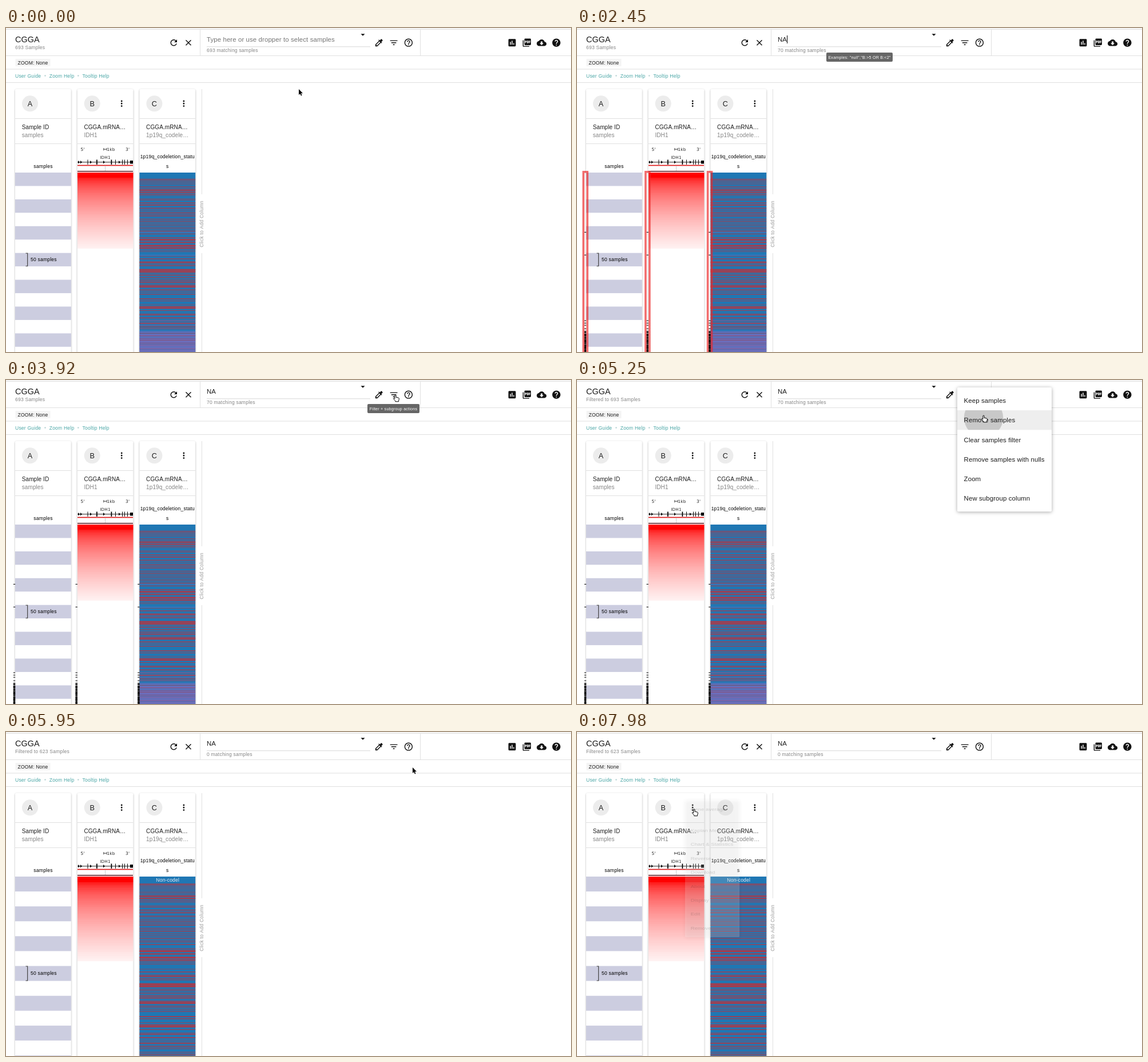
An HTML page with a canvas for the animation above (8000 ms loop, 988x567 px).

```html
<!DOCTYPE html>
<html lang="en">
<head>
<meta charset="utf-8">
<title>Sample filter</title>
<style>
  html, body { margin: 0; width: 100%; height: 100%; overflow: hidden; background: #fff; }
  canvas { display: block; }
</style>
</head>
<body>
<canvas id="stage" width="988" height="567"></canvas>
<script>
const ctx = document.getElementById('stage').getContext('2d');
const LOOP = 8000, STEP = 70;
const INK = '#1c1c1c', GREY = '#858585', RULE = '#e0e0e0';
const SANS = '"Liberation Sans", Arial, sans-serif', WIDE = '"DejaVu Sans", sans-serif';
const BODY = 11.43, SMALL = 10, CAPTION = 8.57, TIP = 7.15;
const TOP = 253, COLS = [16, 124.7, 233.4], COL_W = 97.8;

const ICONS = Object.fromEntries(Object.entries({
  refresh: 'M17.65 6.35C16.2 4.9 14.21 4 12 4c-4.42 0-7.99 3.58-7.99 8s3.57 8 7.99 8c3.73 0 6.84-2.55 7.73-6h-2.08c-.82 2.33-3.04 4-5.65 4-3.31 0-6-2.69-6-6s2.69-6 6-6c1.66 0 3.14.69 4.22 1.78L13 11h7V4z',
  close: 'M19 6.41L17.59 5 12 10.59 6.41 5 5 6.41 10.59 12 5 17.59 6.41 19 12 13.41 17.59 19 19 17.59 13.41 12z',
  drop: 'M7 10l5 5 5-5z',
  dropper: 'M20.71 5.63l-2.34-2.34c-.39-.39-1.02-.39-1.41 0l-3.12 3.12-1.93-1.91-1.41 1.41 1.42 1.42L3 16.25V21h4.75l8.92-8.92 1.42 1.42 1.41-1.41-1.92-1.92 3.12-3.12c.4-.4.4-1.03.01-1.42zM6.92 19L5 17.08l8.06-8.06 1.92 1.92z',
  filter: 'M10 18h4v-2h-4zM3 6v2h18V6zM6 13h12v-2H6z',
  helpOutline: 'M11 18h2v-2h-2zm1-16C6.48 2 2 6.48 2 12s4.48 10 10 10 10-4.48 10-10S17.52 2 12 2zm0 18c-4.41 0-8-3.59-8-8s3.59-8 8-8 8 3.59 8 8-3.59 8-8 8zm0-14c-2.21 0-4 1.79-4 4h2c0-1.1.9-2 2-2s2 .9 2 2c0 2-3 1.75-3 5h2c0-2.25 3-2.5 3-5 0-2.21-1.79-4-4-4z',
  chart: 'M19 3H5c-1.1 0-2 .9-2 2v14c0 1.1.9 2 2 2h14c1.1 0 2-.9 2-2V5c0-1.1-.9-2-2-2zM9 17H7v-7h2zm4 0h-2V7h2zm4 0h-2v-4h2z',
  pdf: 'M20 2H8c-1.1 0-2 .9-2 2v12c0 1.1.9 2 2 2h12c1.1 0 2-.9 2-2V4c0-1.1-.9-2-2-2zm-8.5 7.5c0 .83-.67 1.5-1.5 1.5H9v2H7.5V7H10c.83 0 1.5.67 1.5 1.5zm5 2c0 .83-.67 1.5-1.5 1.5h-2.5V7H15c.83 0 1.5.67 1.5 1.5zm4-3H19v1h1.5V11H19v2h-1.5V7h3zM9 9.5h1v-1H9zM4 6H2v14c0 1.1.9 2 2 2h14v-2H4zm10 5.5h1v-3h-1z',
  cloud: 'M19.35 10.04C18.67 6.59 15.64 4 12 4 9.11 4 6.6 5.64 5.35 8.04 2.34 8.36 0 10.91 0 14c0 3.31 2.69 6 6 6h13c2.76 0 5-2.24 5-5 0-2.64-2.05-4.78-4.65-4.96zM17 13l-5 5-5-5h3V9h4v4z',
  help: 'M12 2C6.48 2 2 6.48 2 12s4.48 10 10 10 10-4.48 10-10S17.52 2 12 2zm1 17h-2v-2h2zm2.07-7.75l-.9.92C13.45 12.9 13 13.5 13 15h-2v-.5c0-1.1.45-2.1 1.17-2.83l1.24-1.26c.37-.36.59-.86.59-1.41 0-1.1-.9-2-2-2s-2 .9-2 2H8c0-2.21 1.79-4 4-4s4 1.79 4 4c0 .88-.36 1.68-.93 2.25z',
  more: 'M10 6a2 2 0 1 1 4 0a2 2 0 1 1-4 0M10 12a2 2 0 1 1 4 0a2 2 0 1 1-4 0M10 18a2 2 0 1 1 4 0a2 2 0 1 1-4 0'
}).map(([name, d]) => [name, new Path2D(d)]));

const POINTERS = {
  arrow: new Path2D('M0 0V10L2.3 7.9 3.9 11.6 5.5 10.9 3.9 7.3H7z'),
  text: new Path2D('M-3-5.5q3 0 3 2v7q0 2-3 2M3-5.5q-3 0-3 2M0 3.5q0 2 3 2M-2 1.2h4'),
  hand: new Path2D('M-1.1 1.1Q-1 0 0 0T1.1 1.1V4.2L5.2 5.1Q6.6 5.5 6.4 7.2L5.6 10.2V11.8H-.2V10.6L-3.6 6.6Q-3.4 5.2-2 5.8L-1.1 6.6z')
};

// Pointer moves: start, end, target x, target y, downward bow
const MOVES = [
  [70, 490, 389, 21, 0], [2940, 3570, 681, 26, 0], [4480, 4970, 711, 62, 0],
  [6440, 7280, 241, 132, 40], [7280, 7560, 205, 135, 0]
];

const FILTER_MENU = {
  x: 665, y: 13, w: 165, gap: 0,
  items: ['Keep samples', 'Remove samples', 'Clear samples filter', 'Remove samples with nulls', 'Zoom', 'New subgroup column']
};
const COLUMN_MENU = {
  x: 189, y: 119, w: 114, gap: 17.8,
  items: ['Gene average', 'Kaplan Meier', 'Chart & Statistics', 'Reverse', 'Download', 'About', 'Display', 'Edit', 'Remove']
};

// One status per sample: b = non-codel, r = codel, n = no data
let seed = 11;
const random = () => (seed = (seed * 16807) % 2147483647) / 2147483647;
const NULL_ROWS = [222, 307, 552, 561, 569, 582], CODEL_RUNS = [65, 250, 272, 369, 426, 505];
const allRows = Array.from({ length: 693 }, (_, i) => {
  const codel = random() < 0.27, missing = i >= 590 && random() < 0.62;
  if (missing || NULL_ROWS.includes(i)) return 'n';
  return CODEL_RUNS.some(c => Math.abs(i - c) < 3) || (codel && i > 19) ? 'r' : 'b';
});
const keptRows = allRows.filter(s => s !== 'n');

const clamp = v => Math.max(0, Math.min(1, v));
const smooth = v => (v = clamp(v), v * v * (3 - 2 * v));
const fade = (t, from, to, d = 140) => Math.min(clamp((t - from) / d), clamp((to - t) / d));

function rect(x, y, w, h, color) {
  ctx.fillStyle = color;
  ctx.fillRect(x, y, w, h);
}

function disc(x, y, r, color) {
  ctx.fillStyle = color;
  ctx.beginPath();
  ctx.arc(x, y, r, 0, 7);
  ctx.fill();
}

function text(s, x, y, size = CAPTION, color = INK, align = 'left', family = SANS) {
  ctx.font = `${size}px ${family}`;
  ctx.letterSpacing = size < 9 ? '0.2px' : '0.1px';
  ctx.textAlign = align;
  ctx.fillStyle = color;
  ctx.fillText(s, x, y);
  return ctx.measureText(s).width;
}

function icon(name, x, y, scale = 0.7146) {
  ctx.save();
  ctx.translate(x, y);
  ctx.scale(scale, scale);
  ctx.translate(-12, -12);
  ctx.fillStyle = '#111';
  ctx.fill(ICONS[name], 'evenodd');
  ctx.restore();
}

function panel(x, y, w, h, blur, alpha) {
  ctx.save();
  ctx.shadowColor = `rgba(0,0,0,${alpha})`;
  ctx.shadowBlur = blur;
  ctx.shadowOffsetY = 1;
  ctx.fillStyle = '#fff';
  ctx.beginPath();
  ctx.roundRect(x, y, w, h, 2);
  ctx.fill();
  ctx.restore();
}

function tooltip(s, x, y, w, alpha) {
  ctx.globalAlpha = alpha;
  ctx.fillStyle = '#666';
  ctx.beginPath();
  ctx.roundRect(x, y, w, 16, 2);
  ctx.fill();
  text(s, x + w / 2, y + 10.6, TIP, '#fff', 'center');
  ctx.globalAlpha = 1;
}

function drawHeader(t) {
  rect(0, 1.5, 988, 1.2, '#dcdcdc');
  for (const y of [48, 71.5, 95]) rect(0, y, 988, 1, RULE);
  for (const x of [339, 724]) rect(x, 3, 1, 45, RULE);

  text('CGGA', 16, 25, 14.4);
  const count = t < 5180 ? '693' : t < 5600 ? 'Filtered to 693' : 'Filtered to 623';
  text(count + ' Samples', 16, 37.3, CAPTION, GREY);
  icon('refresh', 293.3, 25.7);
  icon('close', 319, 25.7);

  const typed = t < 1960 ? '' : t < 2170 ? 'N' : 'NA';
  const width = typed ? text(typed, 351, 24, BODY) : 0;
  if (!typed) text('Type here or use dropper to select samples', 351, 24, BODY, '#757575');
  if ((t >= 630 && t < 1120) || (t >= 1680 && t < 2660) || (t >= 3150 && t < 3640)) rect(351 + width, 13, 1, 14, '#000');
  rect(351, 32.3, 286, 1, '#d8d8d8');
  text((t < 2240 ? 693 : t < 5600 ? 70 : 0) + ' matching samples', 351, 41.5, CAPTION, GREY);
  icon('drop', 624, 11.6);
  ['dropper', 'filter', 'helpOutline'].forEach((name, i) => icon(name, 652.3 + i * 25.8, 25.7));
  ['chart', 'pdf', 'cloud', 'help'].forEach((name, i) => icon(name, 885 + i * 25.8, 25.7));

  rect(16.5, 54, 61, 13, '#f4f4f4');
  text('ZOOM: None', 20.5, 63.5);
  [['User Guide', 16], ['Zoom Help', 75.7], ['Tooltip Help', 133.6]].forEach(([s, x]) => text(s, x, 86.8, CAPTION, '#4aa6a6'));
  for (const x of [68.5, 126.3]) disc(x, 83.5, 1.3, '#b8d4d4');
}

function drawCards() {
  const titles = [['Sample ID', 'samples'], ['CGGA.mRNA…', 'IDH1'], ['CGGA.mRNA…', '1p19q_codele…']];
  COLS.forEach((x, i) => {
    panel(x, 107, COL_W, 480, 3, 0.32);
    disc(x + 26, 132.3, 14, '#ececec');
    text('ABC'[i], x + 26, 136.7, 12.6, INK, 'center');
    if (i) icon('more', x + 77.5, 132.3);
    for (const y of [158, 202]) rect(x, y, COL_W, 1, RULE);
    text(titles[i][0], x + 11.7, 177, SMALL);
    text(titles[i][1], x + 11.7, 191, SMALL, GREY);
  });
  text('samples', 65, 244.8, CAPTION, '#000', 'center');
  text('1p19q_codeletion_statu', 282.3, 228, CAPTION, '#000', 'center');
  text('s', 282.3, 244.8, CAPTION, '#000', 'center');

  rect(342, 107, 1, 184, RULE);
  rect(342, 394, 1, 173, RULE);
  ctx.save();
  ctx.translate(345, 343);
  ctx.rotate(-Math.PI / 2);
  text('Click to Add Column', 0, 0, CAPTION, '#999', 'center');
  ctx.restore();
}

function drawGene() {
  text("5'", 130.5, 214.5, 7.5, '#222', 'left', WIDE);
  text("3'", 209, 214.5, 7.5, '#222', 'left', WIDE);
  text('1kb', 176.5, 215, 7.2, '#222', 'left', WIDE);
  text('IDH1', 173.5, 229, 7.2, '#222', 'center', WIDE);
  rect(170.5, 211.8, 5.5, 0.8, '#222');
  for (const x of [170.5, 175.5]) rect(x, 210, 0.8, 4.5, '#222');
  rect(125, 234.3, 97, 1, '#222');
  for (const x of [142.5, 158, 183.5, 191, 203, 207, 212]) rect(x, 230.5, x === 158 || x === 183.5 ? 1.8 : 1, 8.5, '#000');
  for (const x of [126, 130, 147, 170, 197]) {
    ctx.beginPath();
    ctx.moveTo(x, 232);
    ctx.lineTo(x + 3, 234.8);
    ctx.lineTo(x, 237.6);
    ctx.fillStyle = '#000';
    ctx.fill();
  }
  rect(217, 232, 5, 5.5, '#000');
  rect(125, 239.7, 97, 1.6, '#d11');
  rect(173, 241, 1, 9, '#ccc');
  rect(125, 250, 97, 1.5, '#5a1018');
}

function drawData(t) {
  const rowHeight = n => 325 / n;
  const stripe = 50 * rowHeight(t < 5600 ? 693 : 623);
  for (let y = TOP; y < 567; y += 2 * stripe) rect(16, y, COL_W, stripe, '#cccde0');
  const mark = TOP + 6 * stripe;
  rect(37, mark, 1.2, stripe, '#444');
  for (const y of [mark, mark + stripe - 1]) rect(34.5, y, 3, 1, '#444');
  text('50 samples', 43, mark + stripe / 2 + 2.6, CAPTION, '#000');

  const filtered = t >= 5740;
  const h = rowHeight(filtered ? 623 : 693), heat = 284 * h;
  for (let y = 0; y < heat; y++) {
    const f = Math.floor(y / heat * 45) / 45;
    const g = Math.round(244 * Math.pow(clamp((f - 0.045) / 0.955), 0.53));
    rect(125, TOP + y, 97.5, Math.min(1, heat - y), `rgb(255,${g},${g})`);
  }

  rect(COLS[2], TOP, COL_W, 314, '#1f77b4');
  (filtered ? keptRows : allRows).forEach((s, i) => {
    if (s !== 'b') rect(COLS[2], TOP + i * h, COL_W, h, s === 'r' ? '#d62728' : '#9467bd');
  });
  if (filtered) text('Non-codel', 282.7, 262.3, CAPTION, '#e6eef5', 'center');
}

function drawMatches(t) {
  if (t < 2240 || t >= 5600) return;
  const glow = fade(t, 2170, 2660, 210);
  COLS.forEach(x => {
    allRows.forEach((s, i) => {
      if (s === 'n') rect(x - 3.2, TOP + i * 325 / 693 - 0.2, 3.4, 1, '#000');
    });
    ctx.strokeStyle = `rgba(236,40,40,${0.68 * glow})`;
    ctx.lineWidth = 3.6;
    ctx.strokeRect(x - 4.8, 251.8, 7, 330);
  });
}

// Menu grows from its top left corner while it fades in
function drawMenu(menu, progress, hover, ripple) {
  if (progress <= 0) return;
  const ROW = 34.3, PAD = 5.7, grow = smooth(progress * 1.5);
  ctx.save();
  ctx.globalAlpha = smooth(progress);
  ctx.translate(menu.x, menu.y);
  ctx.scale(0.75 + 0.25 * grow, 0.5625 + 0.4375 * grow);
  panel(0, 0, menu.w, 2 * PAD + menu.items.length * ROW + menu.gap, 6, 0.35);
  menu.items.forEach((label, i) => {
    const y = PAD + i * ROW + (i ? menu.gap : 0);
    if (i === hover) {
      rect(0, y, menu.w, ROW, '#eee');
      if (ripple) {
        ctx.save();
        ctx.beginPath();
        ctx.rect(0, y, menu.w, ROW);
        ctx.clip();
        disc(46, 53, ripple, 'rgba(0,0,0,.16)');
        ctx.restore();
      }
    }
    text(label, 11.6, y + 21.2, BODY);
  });
  ctx.restore();
}

function pointerAt(t) {
  let x = 512, y = 107;
  for (const [start, end, toX, toY, bow] of MOVES) {
    const u = smooth((t - start) / (end - start));
    x += (toX - x) * u;
    y += (toY - y) * u + bow * Math.sin(Math.PI * u);
  }
  return { x, y };
}

function drawPointer(t, { x, y }) {
  if (t >= 1960 && t < 2940) return;
  const onAction = (t > 3000 && t < 5600 && x > 642) || t >= 7490;
  const kind = onAction ? 'hand' : y < 38 && x < 642 ? 'text' : 'arrow';
  ctx.save();
  ctx.translate(x, y);
  ctx.lineJoin = 'round';
  if (kind === 'hand') {
    ctx.fillStyle = '#fff';
    ctx.fill(POINTERS.hand);
  } else {
    ctx.strokeStyle = '#fff';
    ctx.lineWidth = 2.2;
    ctx.stroke(POINTERS[kind]);
  }
  if (kind === 'arrow') {
    ctx.fillStyle = '#000';
    ctx.fill(POINTERS.arrow);
  } else {
    ctx.strokeStyle = '#000';
    ctx.lineWidth = 1;
    ctx.stroke(POINTERS[kind]);
  }
  ctx.restore();
}

function draw(t) {
  const pointer = pointerAt(t);
  rect(0, 0, 988, 567, '#fff');
  drawHeader(t);
  drawCards();
  drawGene();
  drawData(t);
  drawMatches(t);
  if (t >= 3850 && t < 3920) disc(680, 24, 22, 'rgba(0,0,0,.07)');
  if (t >= 7770 && t < 7910) disc(202, 132, 20, 'rgba(0,0,0,.07)');
  tooltip('Examples: "null","B:>5 OR B:<2"', 436, 43, 116, fade(t, 350, 3290));
  tooltip('Filter + subgroup actions', 632, 42, 91, fade(t, 3500, 4200));

  const open = Math.min(clamp((t - 4020) / 250), clamp((5600 - t) / 250));
  const ripple = t < 5110 ? 0 : 125 * smooth((t - 5040) / 610);
  drawMenu(FILTER_MENU, open, pointer.y > 53 ? 1 : 0, ripple);
  drawMenu(COLUMN_MENU, (t - 7915) / 250);
  drawPointer(t, pointer);
}

function tick() {
  const t = performance.now() % LOOP;
  draw(Math.floor(t / STEP) * STEP);
  requestAnimationFrame(tick);
}
tick();
</script>
</body>
</html>
```
